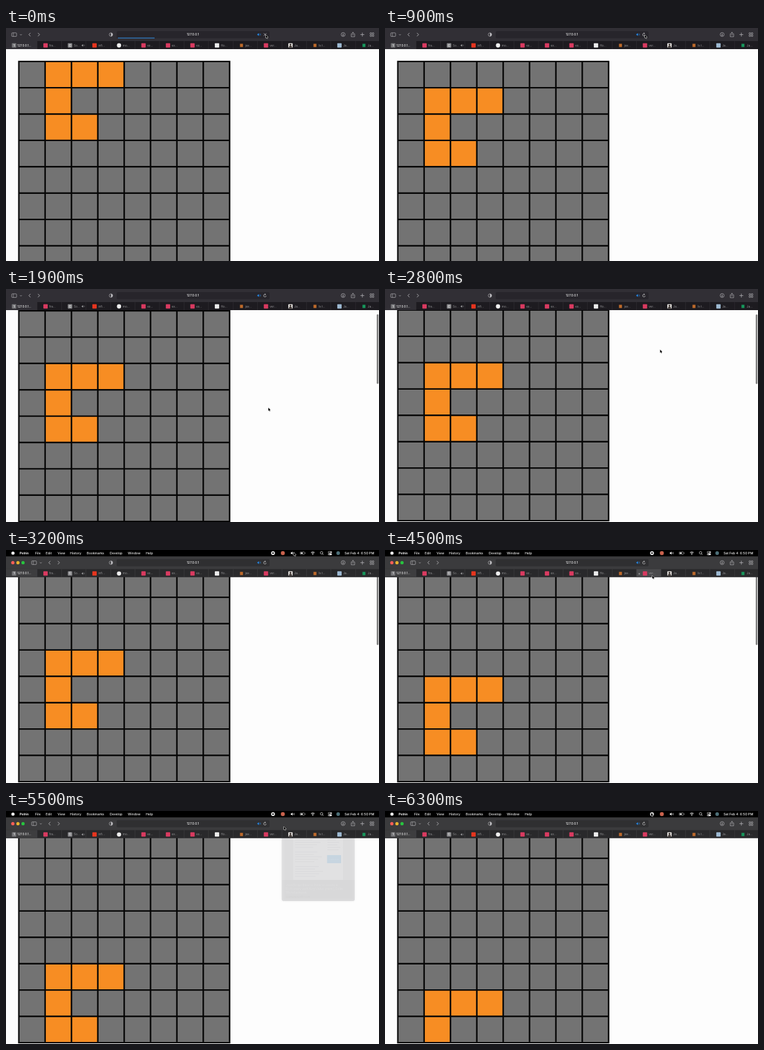
An HTML page with a canvas that plays this animation: 600x375 px, repeating every 6.4 s.

```html
<!DOCTYPE html>
<html lang="en">
<head>
<meta charset="utf-8">
<title>Grid walk</title>
<style>
html, body { margin: 0; width: 100%; height: 100%; overflow: hidden; background: #fdfdfd; }
canvas { display: block; width: 600px; height: 375px; }
</style>
</head>
<body>
<canvas id="stage"></canvas>
<script>
const W = 600, H = 375, LOOP = 6400, STEP = 100;
const CELL = 42.4, GRID_X = 20.5, GRID_Y = 53.7, N = 8;
const SHAPE = [[0, 1], [0, 2], [0, 3], [1, 1], [2, 1], [2, 2]];
const FONT = 'Inter, Roboto, sans-serif';

const canvas = document.getElementById('stage');
const ctx = canvas.getContext('2d');
const ratio = window.devicePixelRatio || 1;
canvas.width = W * ratio;
canvas.height = H * ratio;

const RED = '#d93a60', ORANGE = '#bd6a2b';
// label, icon colour, icon kind
const TABS = [
  ['127.0.0.1...', '#77777a', '1'], ['fra...', RED], ['So...', '#8b8b8e', 'C'],
  ['infi...', '#e5351f'], ['mo...', '#f0f0f0', 'dot'], ['ex...', RED], ['ex...', RED],
  ['ex...', RED], ['Ho...', '#ececec'], ['jav...', ORANGE, 'small'], ['ver...', RED],
  ['Ja...', '#e4e1de', 'person'], ['Is t...', ORANGE, 'small'], ['Ja...', '#9db9d2'],
  ['Ja...', '#16975b', 'small']
];
const MENU = [['File', 47], ['Edit', 64], ['View', 83], ['History', 103],
  ['Bookmarks', 130], ['Develop', 167], ['Window', 196], ['Help', 225]];

// time, x, y of the pointer tip
const POINTER = [
  [0, 418, 11], [1100, 418, 11], [1500, 422, 191], [2600, 422, 191], [3000, 463, 4],
  [3900, 463, 4], [4100, 430, 41], [4500, 430, 41], [4800, 458, 36], [5200, 458, 36],
  [5500, 447, 25], [5900, 447, 25], [6200, 428, 3], [6400, 428, 3]
];

const clamp = v => Math.max(0, Math.min(1, v));
const span = (t, a, b) => clamp((t - a) / (b - a));
const smooth = p => p * p * (3 - 2 * p);
const mix = (a, b, p) => a + (b - a) * p;
const shade = (a, b, p) => `rgb(${a.map((v, i) => Math.round(mix(v, b[i], p)))})`;

function rect(x, y, w, h, color, r = 0) {
  ctx.fillStyle = color;
  ctx.beginPath();
  ctx.roundRect(x, y, w, h, r);
  ctx.fill();
}

function disc(x, y, r, color) {
  ctx.fillStyle = color;
  ctx.beginPath();
  ctx.arc(x, y, r, 0, 7);
  ctx.fill();
}

function ring(x, y, r, color, width = 0.7, from = 0, to = 2 * Math.PI) {
  ctx.strokeStyle = color;
  ctx.lineWidth = width;
  ctx.beginPath();
  ctx.arc(x, y, r, from, to);
  ctx.stroke();
}

function line(points, color, width = 0.8) {
  ctx.strokeStyle = color;
  ctx.lineWidth = width;
  ctx.beginPath();
  points.forEach(([x, y]) => ctx.lineTo(x, y));
  ctx.stroke();
}

function frame(x, y, w, h, color, r = 0.8, width = 0.7) {
  ctx.strokeStyle = color;
  ctx.lineWidth = width;
  ctx.beginPath();
  ctx.roundRect(x, y, w, h, r);
  ctx.stroke();
}

function text(str, x, y, size, color, weight = 400, align = 'left') {
  ctx.font = `${weight} ${size}px ${FONT}`;
  ctx.textAlign = align;
  ctx.fillStyle = color;
  ctx.fillText(str, x, y);
}

function speaker(x, y, color, s = 1) {
  ctx.fillStyle = color;
  ctx.beginPath();
  [[-3, -1], [-1.8, -1], [0, -2.6], [0, 2.6], [-1.8, 1], [-3, 1]]
    .forEach(([dx, dy]) => ctx.lineTo(x + dx * s, y + dy * s));
  ctx.fill();
  for (const r of [1.5, 2.9]) ring(x, y, r * s, color, 0.6 * s, -0.8, 0.8);
}

function drawGrid(row, scroll) {
  const top = GRID_Y - scroll, size = CELL * N;
  rect(GRID_X - 1, top - 1, size + 2.2, size + 2.2, '#050505');
  for (let r = 0; r < N; r++) {
    for (let c = 0; c < N; c++) {
      const on = SHAPE.some(([dr, dc]) => r === row + dr && c === dc);
      rect(GRID_X + c * CELL + 1.2, top + r * CELL + 1.2, CELL - 2.4, CELL - 2.4,
        on ? '#f78d23' : '#737373');
    }
  }
}

function drawPopup(alpha) {
  if (!alpha) return;
  ctx.save();
  ctx.globalAlpha = alpha;
  ctx.shadowColor = 'rgba(0,0,0,.35)';
  ctx.shadowBlur = 4 * ratio;
  rect(443.5, 40, 117.5, 105, '#343436', 3);
  ctx.shadowColor = 'transparent';
  rect(443.5, 43, 117.5, 68, '#f6f6f6');
  rect(462, 43, 80, 68, '#ffffff');
  for (let i = 0; i < 17; i++) {
    if (i % 6 !== 4) rect(465, 46 + i * 3.9, 28 + (i * 13) % 19, 1, '#a5a5a8');
  }
  for (let i = 0; i < 5; i++) rect(517, 46 + i * 4, 14 + (i * 5) % 8, 1, '#a5a5a8');
  rect(516.5, 71, 22.5, 13, '#1b83cc');
  text('Learn more', 527.7, 78, 3, '#fff', 600, 'center');
  ['JavaScript Basics: How to create a', 'Dictionary with Key/Value pairs | Colin', 'Wendlarmann']
    .forEach((s, i) => text(s, 450, 119 + i * 6.4, 5, '#fff', 600));
  text('wendlarsoft.com', 450, 138.2, 5, '#c4c4c4');
  ctx.restore();
}

function drawIcon([, color, kind], x, y) {
  if (kind === 'dot') return disc(x, y, 3.4, color);
  if (kind === 'small') return rect(x - 2.4, y - 2.6, 4.8, 5.2, color);
  rect(x - 3.5, y - 3.5, 7, 7, color, 0.8);
  if (kind === 'person') {
    disc(x, y - 1, 1.5, '#38302d');
    rect(x - 2.3, y + 0.8, 4.6, 2.7, '#38302d', [1.5, 1.5, 0, 0]);
  } else if (kind) {
    text(kind, x, y + 0.2, 4.8, '#f3f3f3', 600, 'center');
  }
}

function drawTabs(m, px, py) {
  rect(0, 21, W, 13, shade([29, 27, 32], [41, 41, 43], m));
  rect(0, 21, 50, 13, shade([49, 47, 53], [61, 61, 63], m));
  TABS.forEach((tab, i) => {
    const x = i ? 50 + 39.4 * (i - 1) : 0;
    const width = i ? 39.4 : 50;
    const hover = i && py > 21 && py < 34 && px >= x && px < x + width;
    if (hover) {
      rect(x, 21, width, 13, '#4a4a4c');
      text('×', x + 4.5, 28, 6, '#c8c8c8', 400, 'center');
    }
    if (i) rect(x - 0.25, 21, 0.5, 13, shade([56, 54, 59], [70, 70, 72], m));
    const ix = i ? x + 13.6 : 13;
    drawIcon(tab, ix, 28);
    text(tab[0], ix + (i ? 6 : 5.2), 28.1, 4.7, i ? '#969698' : '#f2f2f2', i ? 400 : 500);
    if (i === 2) speaker(124, 28, '#98989a', 0.75);
  });
}

function drawToolbar(t, m) {
  const ink = '#b9b8bc', dx = 32 * m;
  rect(0, 0, W, 21.2, shade([49, 47, 53], [59, 59, 61], m));
  rect(178, 5, 246, 11.5, shade([39, 37, 43], [47, 47, 49], m), 2);
  if (m > 0) {
    ctx.globalAlpha = m;
    ['#fe5f57', '#e6b32e', '#28c33f'].forEach((c, i) => disc(11 + i * 8.2, 10.6, 2.6, c));
    ctx.globalAlpha = 1;
  }
  frame(9.2 + dx, 7.8, 7.8, 5.8, ink, 1);
  line([[11.9 + dx, 7.8], [11.9 + dx, 13.6]], ink, 0.6);
  line([[22.5 + dx, 10], [24 + dx, 11.5], [25.5 + dx, 10]], ink, 0.7);
  line([[39.4 + dx, 7.9], [36.8 + dx, 10.6], [39.4 + dx, 13.3]], ink, 0.9);
  line([[51.4 + dx, 7.9], [54 + dx, 10.6], [51.4 + dx, 13.3]], ink, 0.9);

  ring(168.8, 10.6, 2.8, ink);
  ctx.fillStyle = ink;
  ctx.beginPath();
  ctx.arc(168.8, 10.6, 2.8, -Math.PI / 2, Math.PI / 2);
  ctx.fill();
  text('127.0.0.1', 300.5, 10.8, 5, '#f4f4f4', 500, 'center');
  speaker(407, 10.5, '#2584df', 0.9);

  if (t < 300) {
    rect(180, 15.6, 59 + 0.9 * t, 1.1, '#3181cb');
    line([[414.8, 8.5], [418.8, 12.5]], '#d0d0d2');
    line([[418.8, 8.5], [414.8, 12.5]], '#d0d0d2');
  } else {
    ring(416.5, 10.7, 2.1, '#d0d0d2', 0.7, 0.1, 5.2);
    line([[416.3, 7.4], [418, 8.8], [416.3, 10]], '#d0d0d2', 0.6);
  }

  ring(542.3, 10.5, 3.2, ink);
  line([[542.3, 8.6], [542.3, 12.2]], ink, 0.7);
  line([[540.9, 10.9], [542.3, 12.3], [543.7, 10.9]], ink, 0.7);
  line([[556.8, 9.3], [555.3, 9.3], [555.3, 14], [560.9, 14], [560.9, 9.3], [559.4, 9.3]], ink, 0.7);
  line([[558.1, 12], [558.1, 6.8]], ink, 0.7);
  line([[556.7, 8.1], [558.1, 6.7], [559.5, 8.1]], ink, 0.7);
  line([[570.1, 10.6], [576.3, 10.6]], ink);
  line([[573.2, 7.5], [573.2, 13.7]], ink);
  for (const x of [585.7, 589.2]) for (const y of [7.6, 11.1]) frame(x, y, 2.5, 2.5, ink, 0.5);
}

function drawMenu() {
  const ink = '#f2f2f2';
  rect(0, 0, W, 10.2, '#000');
  disc(11.2, 5, 2.6, ink);
  text('Pelrin', 22, 5.1, 5.2, ink, 700);
  MENU.forEach(([label, x]) => text(label, x, 5.1, 5.2, ink, 500));
  disc(429.5, 5, 3.1, ink);
  rect(428.3, 3.8, 2.4, 2.4, '#111');
  disc(445.3, 5, 3.2, '#c9624d');
  speaker(461, 5, ink, 0.95);
  frame(473.2, 3, 7, 4, '#bdbdbd', 1, 0.6);
  rect(474.2, 4, 3.2, 2, ink);
  rect(480.9, 4.2, 0.7, 1.6, '#bdbdbd');
  for (const r of [1.6, 3.1, 4.5]) ring(493.5, 7.4, r, ink, 0.8, -2.3, -0.84);
  disc(493.5, 7, 0.7, ink);
  ring(507.6, 4.5, 2, ink, 0.7);
  line([[509.1, 6], [510.7, 7.6]], ink);
  frame(518.2, 2.4, 5.8, 2.2, ink, 1.1, 0.6);
  disc(522.8, 3.5, 0.9, ink);
  rect(518, 5.6, 6.2, 2.6, ink, 1.3);
  disc(519.5, 6.9, 0.8, '#000');
  disc(534.3, 5, 2.9, '#4d6f78');
  text('Sat Feb 4  6:50 PM', 592.3, 5.1, 5.3, ink, 500, 'right');
}

function pointerAt(t) {
  const i = POINTER.findIndex(p => p[0] > t);
  const [a, b] = [POINTER[i - 1], POINTER[i]];
  const p = smooth(span(t, a[0], b[0]));
  return [mix(a[1], b[1], p), mix(a[2], b[2], p)];
}

function drawPointer(x, y) {
  ctx.beginPath();
  [[0, 0], [0, 5.2], [1.2, 4.1], [2, 6], [2.9, 5.6], [2.1, 3.8], [3.7, 3.7]]
    .forEach(([dx, dy]) => ctx.lineTo(x + dx, y + dy));
  ctx.closePath();
  ctx.strokeStyle = '#fff';
  ctx.lineWidth = 1;
  ctx.lineJoin = 'round';
  ctx.stroke();
  ctx.fillStyle = '#000';
  ctx.fill();
  ctx.lineJoin = 'miter';
}

function draw(t) {
  const row = Math.floor((t + 100) / 1000);
  const scroll = 20 * (1 - Math.pow(1 - span(t, 1600, 2100), 3));
  const m = smooth(span(t, 2800, 3100));
  const [px, py] = pointerAt(t);
  const drop = 9.8 * m;

  ctx.setTransform(ratio, 0, 0, ratio, 0, 0);
  ctx.textBaseline = 'middle';
  rect(0, 0, W, H, '#fdfdfd');
  drawGrid(row, scroll);

  const bar = span(t, 1500, 1700) * (1 - span(t, 4600, 4900));
  if (bar) {
    ctx.globalAlpha = bar;
    rect(596.4, 36 + scroll * 0.25, 2.8, 112, '#7c7c7c', 1.4);
    ctx.globalAlpha = 1;
  }
  drawPopup(span(t, 4800, 5000) * (1 - span(t, 5300, 5530)));

  ctx.save();
  ctx.translate(0, drop);
  drawToolbar(t, m);
  drawTabs(m, px, py - drop);
  ctx.restore();
  if (m > 0) {
    ctx.save();
    ctx.translate(0, drop - 9.8);
    drawMenu();
    ctx.restore();
  }
  drawPointer(px, py);
}

const start = performance.now();
function tick() {
  const t = (performance.now() - start) % LOOP;
  draw(Math.floor(t / STEP) * STEP);
  requestAnimationFrame(tick);
}
tick();
</script>
</body>
</html>
```
